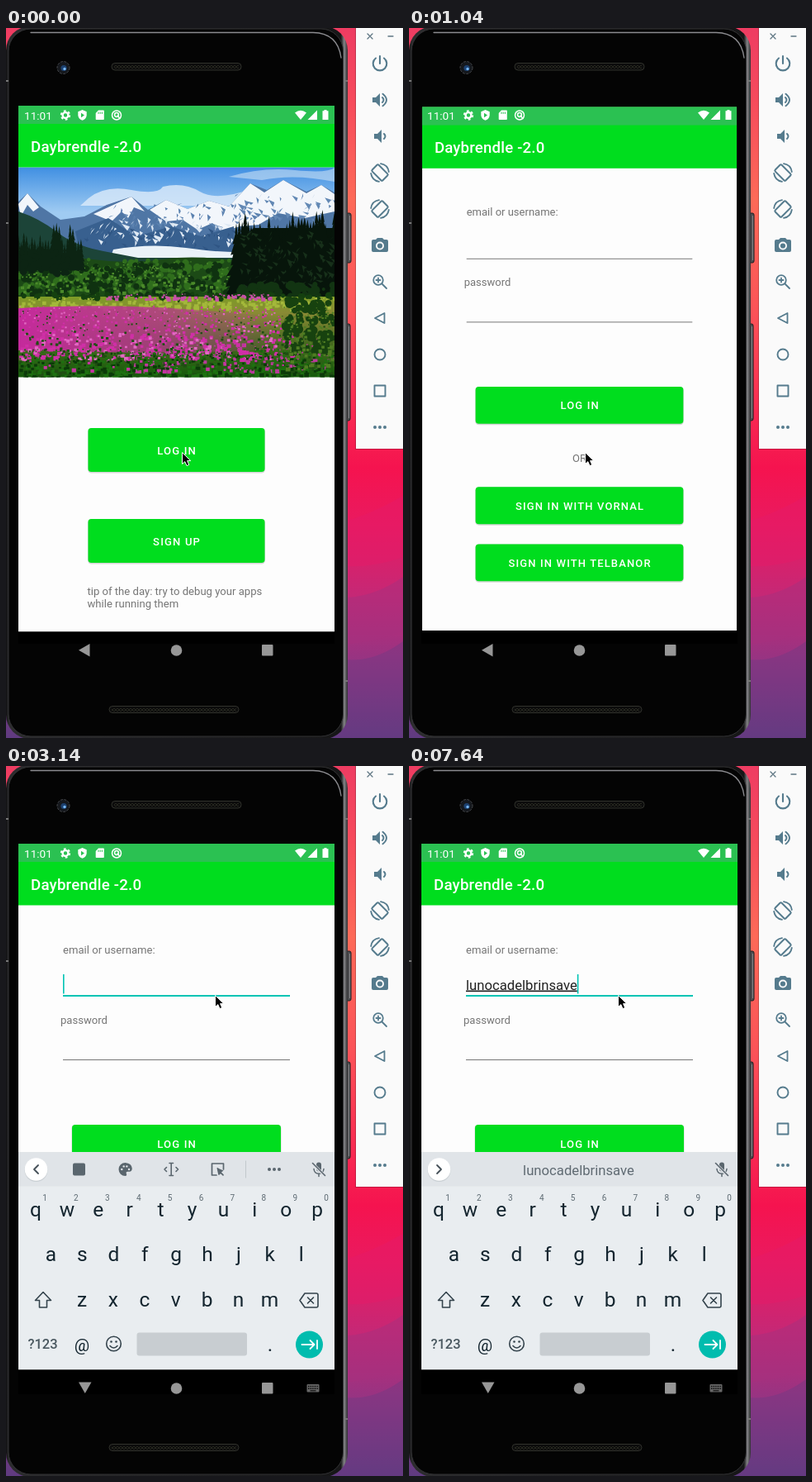
Animation, 481 px wide and 859 px high, one loop 8 s. Source, as an HTML page:

```html
<!DOCTYPE html>
<html lang="en">
<head>
<meta charset="utf-8">
<title>Login demo</title>
<style>
  html, body { margin: 0; width: 100%; height: 100%; overflow: hidden; background: #050505; }
  svg { display: block; }
  text { font-family: Roboto, sans-serif; white-space: pre; }
  .label { font-size: 13.1px; fill: #757575; }
  .title { font-size: 18.7px; font-weight: 500; fill: #fff; letter-spacing: .2px; }
  .btn { font-size: 13.05px; font-weight: 500; fill: #fff; letter-spacing: 1.16px; text-anchor: middle; }
  .key { font-size: 24.5px; fill: #14252f; text-anchor: middle; }
  .sup { font-size: 10px; fill: #5d6a72; text-anchor: middle; }
  .line { fill: none; stroke-linecap: round; stroke-linejoin: round; }
</style>
</head>
<body>
<svg id="stage" width="481" height="859" viewBox="0 0 481 859">
  <defs>
    <linearGradient id="wall" x2="0" y2="1">
      <stop offset="0" stop-color="#ee3c62"/><stop offset=".1" stop-color="#f64a5c"/>
      <stop offset=".24" stop-color="#fd6a58"/><stop offset=".4" stop-color="#fb5358"/>
      <stop offset=".52" stop-color="#f93052"/><stop offset=".62" stop-color="#f5134f"/>
      <stop offset=".7" stop-color="#e91a60"/><stop offset=".8" stop-color="#c52876"/>
      <stop offset=".89" stop-color="#963482"/><stop offset="1" stop-color="#5f3b80"/>
    </linearGradient>
    <linearGradient id="edge">
      <stop offset="0" stop-color="#101011"/><stop offset=".008" stop-color="#2c2c2e"/>
      <stop offset=".98" stop-color="#161617"/><stop offset=".99" stop-color="#858588"/>
      <stop offset="1" stop-color="#2d2d2f"/>
    </linearGradient>
    <linearGradient id="sky" x2="0" y2="1">
      <stop offset="0" stop-color="#3f8fe2"/><stop offset=".5" stop-color="#9fcbf2"/>
    </linearGradient>
    <linearGradient id="meadow" x2="0" y2="1">
      <stop offset="0" stop-color="#7d9c26"/><stop offset=".2" stop-color="#8a8a35"/>
      <stop offset=".55" stop-color="#4b6b20"/><stop offset="1" stop-color="#145a0a"/>
    </linearGradient>
    <linearGradient id="bloom">
      <stop offset="0" stop-color="#c52a9c"/><stop offset=".55" stop-color="#b9348f" stop-opacity=".75"/>
      <stop offset="1" stop-color="#a04080" stop-opacity="0"/>
    </linearGradient>
    <pattern id="mesh" width="4" height="4" patternUnits="userSpaceOnUse">
      <path d="M0 1h2M2 3h2" stroke="#3d4030" stroke-width="1"/>
    </pattern>
    <clipPath id="screen"><rect x="15" y="94" width="383" height="651"/></clipPath>
    <clipPath id="app"><rect x="15" y="94" width="383" height="636.500"/></clipPath>
    <clipPath id="press"><rect x="99.500" y="484" width="214" height="53" rx="4"/></clipPath>
  </defs>

  <rect width="481" height="859" fill="url(#wall)"/>
  <path d="M400 600Q440 590 481 566V640Q440 655 400 650z" fill="#e61a68" opacity=".5"/>
  <path d="M400 690Q445 690 481 664V730Q440 745 400 746z" fill="#a8317f" opacity=".5"/>
  <path d="M400 762Q440 772 481 742V859H400z" fill="#6d3a83" opacity=".4"/>

  <g fill="#4d4d50" stroke="#1e1e20">
    <rect x="412" y="224" width="6" height="60" rx="2"/>
    <rect x="412" y="358" width="5" height="117" rx="2"/>
  </g>
  <path d="M416.500 227v54M415.500 361v111" stroke="#88888b"/>
  <rect y="-2" width="414" height="862" rx="29" fill="url(#edge)"/>
  <rect x="3" y="1" width="405.500" height="856" rx="27" fill="#040404" stroke="#333335"/>
  <path d="M30 5.500H372Q402 6 406 36" class="line" stroke="#8c8c90" stroke-width="1.300"/>
  <path d="M0 236h3M0 64h3M410 64h4M410 790h4" stroke="#777" stroke-width="2"/>
  <g stroke="#3c3d35" stroke-width=".8">
    <rect x="128" y="42.500" width="157" height="8.500" rx="4" fill="#0c0c0c"/>
    <rect x="125" y="820.500" width="157" height="8" rx="4" fill="#0c0c0c"/>
  </g>
  <rect x="131" y="45" width="151" height="4" fill="url(#mesh)"/>
  <rect x="128" y="823" width="151" height="4" fill="url(#mesh)"/>
  <circle cx="69.500" cy="48" r="7.500" fill="#15181d" stroke="#47484c" stroke-dasharray="3 1.500"/>
  <circle cx="70" cy="48.500" r="3.600" fill="#1d4170"/><circle cx="71" cy="49.500" r="1.700" fill="#77b7f4"/>

  <g clip-path="url(#screen)">
    <rect x="15" y="94" width="383" height="651"/>
    <g id="home"></g>
    <g id="login"></g>
  </g>
  <g id="status"></g>
  <g clip-path="url(#app)"><g id="keyboard"></g></g>
  <rect id="navBack" x="15" y="730.500" width="383" height="29.500"/>
  <g id="nav" fill="#979797">
    <path id="back"/><circle cx="206.500" cy="753" r="6.800"/>
    <rect x="310" y="746" width="13.500" height="13.500" rx="1"/>
    <g id="kbIcon">
      <rect x="364.500" y="748" width="15" height="9.500" rx="1" fill="#666"/>
      <path d="M366 750.500h12M366 753.200h12" stroke="#000" stroke-width="1.400" stroke-dasharray="1.200 1"/>
      <path d="M368.500 755.800h7" stroke="#000" stroke-width="1"/>
    </g>
  </g>
  <g id="tools"></g>
  <path id="mouse" d="M.5 .5V14.500L3.800 11.600 6 16.600 8.700 15.400 6.600 10.600H10.800Z" fill="#000" stroke="#fff" stroke-width="1"/>
</svg>

<script>
const $ = id => document.getElementById(id);
const GREEN = '#00dd1e', TEAL = '#00c4b4', NAME = 'lunocadelbrinsave';

let seed = 11;
const rnd = (a = 0, b = 1) => a + (b - a) * ((seed = seed * 16807 % 2147483647) / 2147483647);
const many = (n, f) => Array.from({ length: n }, (_, i) => f(i)).join('');
const text = (cls, x, y, s, extra = '') => `<text class="${cls}" x="${x}" y="${y}" ${extra}>${s}</text>`;
const fill = (d, c, extra = '') => `<path d="${d}" fill="${c}" ${extra}/>`;
const put = (x, y, body) => `<g transform="translate(${x} ${y})">${body}</g>`;
const stroke = (d, c, w = 1.6) => `<path class="line" d="${d}" stroke="${c}" stroke-width="${w}"/>`;

function button(x, y, w, h, label) {
  return `<rect x="${x - .5}" y="${y}" width="${w + 1}" height="${h + 1.5}" rx="4.5" fill="#000" opacity=".16"/>
    <rect x="${x}" y="${y}" width="${w}" height="${h}" rx="4" fill="${GREEN}"/>` +
    text('btn', x + w / 2 + .6, y + h / 2 + 5, label);
}

function frame(body) {
  return `<rect x="15" y="94" width="383" height="636.500" fill="#fdfdfd"/>
    <rect x="15" y="730.500" width="383" height="33"/>${body}
    <rect x="15" y="94" width="383" height="74.500" fill="${GREEN}"/>
    <rect x="15" y="94" width="383" height="22" fill="#2bc152"/>` +
    text('title', 30, 149.5, 'Daybrendle -2.0');
}

// Conifer: stacked jagged tiers
function tree(x, base, h) {
  const w = h * .16;
  let l = '', r = '';
  for (let i = 1; i <= 7; i++) {
    const y = base - h + h * i / 7, e = w * i / 7 * rnd(.8, 1.2);
    l += `L${(x - e).toFixed(1)} ${y.toFixed(1)}L${(x - e * .55).toFixed(1)} ${(y - 1).toFixed(1)}`;
    r = `L${(x + e * .55).toFixed(1)} ${(y - 1).toFixed(1)}L${(x + e).toFixed(1)} ${y.toFixed(1)}` + r;
  }
  return `M${x} ${base - h}${l}${r}z`;
}

function specks(n, x0, x1, y0, y1, size) {
  return many(n, () => {
    const y = rnd(y0, y1), w = size * (.5 + (y - y0) / (y1 - y0)) * rnd(.6, 1.3);
    return `M${rnd(x0, x1).toFixed(1)} ${y.toFixed(1)}h${w.toFixed(1)}v${(w * .9).toFixed(1)}h${(-w).toFixed(1)}z`;
  });
}

function puffs(n, x0, x1, y0, y1, r0, r1) {
  return many(n, () => {
    const r = rnd(r0, r1).toFixed(1);
    return `M${rnd(x0, x1).toFixed(1)} ${rnd(y0, y1).toFixed(1)}a${r} ${r} 0 1 0 .1 0z`;
  });
}

// Slanting rock and snow streaks
function streaks(n, x0, x1, y0, y1) {
  return many(n, () => {
    const h = rnd(3, 9), lean = rnd(-7, 7);
    return `M${rnd(x0, x1).toFixed(1)} ${rnd(y0, y1).toFixed(1)}l${lean.toFixed(1)} ${h.toFixed(1)}l${rnd(1, 4).toFixed(1)} ${(-h * .6).toFixed(1)}z`;
  });
}

function photo() {
  return `<svg x="15" y="168.500" width="383" height="254" viewBox="15 168.500 383 254">
    <rect x="15" y="168" width="383" height="110" fill="url(#sky)"/>` +
    fill('M100 206Q120 190 152 196T190 192Q215 186 235 198T300 194V215H90z', '#dcecfa', 'opacity=".8"') +
    fill('M270 180Q310 168 350 172T398 169V186Q350 176 310 184z', '#c8e0f6', 'opacity=".6"') +
    fill('M15 210L26 200 42 216 66 232 95 228 122 214 152 204 172 220 194 208 220 219 246 209 270 216 296 188 316 196 336 184 364 198 382 190 398 199V285H15z', '#4f76a5') +
    fill('M15 213L26 200 40 217 33 222 26 214 18 228zM106 225L152 204 168 222 155 217 148 230 140 222 128 234zM174 220L194 208 220 219 246 209 270 216 296 188 313 199 336 184 364 200 382 190 398 201V222L362 230 330 224 306 238 284 240 262 246 250 236 232 244 214 232 194 234z', '#f2f6fb') +
    fill(streaks(70, 125, 300, 212, 238), '#5b82b0') + fill(streaks(50, 280, 398, 198, 232), '#6288b4') +
    fill('M84 246L124 230 158 252 200 240 236 252 276 240V275H90z', '#38608f') +
    fill(streaks(85, 100, 275, 228, 258), '#dfe9f4') + fill(streaks(45, 85, 275, 240, 264), '#2f5584') +
    fill('M130 268Q175 260 218 266T290 271V285H124z', '#eaf2f8') +
    fill('M15 222Q40 230 62 247T118 270L160 278H290V340H15z', '#1c4438') +
    fill('M15 284Q60 274 105 280T190 280T290 283H398V335H15z', '#1c4a16') +
    fill(puffs(190, 15, 285, 278, 318, 2, 5), '#2f6d1c') + fill(puffs(190, 15, 290, 282, 324, 2, 5), '#0f3210') +
    fill(specks(220, 15, 290, 282, 320, 2.5), '#4b8a2a') +
    fill(many(24, i => tree(15 + i * 3.3, 294, rnd(30, 60))), '#0c2413') +
    fill(puffs(60, 15, 75, 266, 294, 2, 5), '#0c2413') +
    fill('M279 262L300 242H398V330H283z', '#07150b') +
    fill(many(34, i => tree(279 + i * 3.6, 326, rnd(74, 106))), '#07150b') +
    fill(streaks(120, 282, 398, 245, 312), '#17301a') +
    fill(puffs(70, 282, 398, 305, 328, 2, 6), '#123412') +
    `<rect x="15" y="325" width="383" height="98" fill="url(#meadow)"/>` +
    fill(puffs(70, 15, 398, 319, 325, 2, 4), '#14400f') +
    fill(specks(200, 15, 398, 326, 337, 4), '#a3b83a') +
    fill(specks(90, 120, 320, 321, 327, 3), '#c850a8') +
    '<path d="M15 339Q120 333 215 340T335 350V388Q220 396 15 390z" fill="url(#bloom)"/>' +
    fill(specks(420, 15, 345, 336, 398, 3.4), '#cf2fa6') +
    fill(specks(240, 15, 330, 336, 401, 2.8), '#e268c2') +
    fill(specks(150, 150, 398, 372, 414, 3.2), '#b83a98') +
    fill(specks(420, 15, 398, 342, 423, 2.8), '#1f4e12') +
    fill(specks(420, 15, 398, 388, 423, 3.4), '#1d7010') +
    fill(specks(260, 15, 398, 392, 423, 3.4), '#0b3a08') +
    fill(specks(60, 15, 340, 394, 414, 3), '#c434a0') +
    fill(puffs(110, 338, 398, 324, 388, 2, 6), '#17420f') +
    fill(specks(110, 335, 398, 335, 412, 3), '#4f7d22') + '</svg>';
}

$('home').innerHTML = frame(
  photo() + button(99.5, 484, 214, 53, 'LOG IN') + button(99.5, 594, 214, 53, 'SIGN UP') +
  text('label', 98.5, 685.5, 'tip of the day: try to debug your apps') +
  text('label', 98.5, 700.5, 'while running them') +
  '<circle id="ripple" cx="213" cy="513" fill="#fff" opacity=".24" clip-path="url(#press)"/>');

$('login').innerHTML = frame(
  text('label', 69, 226.5, 'email or username:') + text('label', 66, 311.5, 'password') +
  `<rect id="rule" x="69" width="275"/><rect x="69" y="355" width="275" height="1" fill="#777"/>` +
  text('', 69, 270.5, '', 'id="typed" font-size="16.7" fill="#222" text-decoration="underline"') +
  `<rect id="caret" y="252" width="1.600" height="23.500" fill="${TEAL}"/>` +
  button(80, 434, 253, 45, 'LOG IN') +
  text('label', 206.5, 525.5, 'OR', 'text-anchor="middle"') +
  button(80, 556, 253, 45, 'SIGN IN WITH VORNAL') + button(80, 625.5, 253, 45, 'SIGN IN WITH TELBANOR'));

$('status').innerHTML = text('', 22, 110.5, '11:01', 'font-size="13.6" fill="#fff"') +
  `<circle cx="72" cy="105.500" r="3.400" fill="none" stroke="#fff" stroke-width="2.400"/>
   <circle cx="72" cy="105.500" r="5.200" fill="none" stroke="#fff" stroke-width="2" stroke-dasharray="2.700 2.745"/>` +
  fill('M92.500 99l5.200 2.200v4q0 4.500-5.200 6.600-5.200-2.100-5.200-6.600v-4z', '#fff') +
  fill('M91 102.800v5.400l4-2.700z', '#2bc152') +
  fill('M112 99.500h6q.8 0 .8.800v10q0 .8-.8.800h-8.500q-.8 0-.8-.8v-7.300z', '#fff') +
  stroke('M112 102v1.500M114.200 102v1.500M116.400 102v1.500', '#2bc152', 1) +
  `<circle cx="134" cy="105.500" r="5.500" fill="none" stroke="#fff" stroke-width="1.500"/>
   <circle cx="134" cy="105" r="2.400" fill="none" stroke="#fff" stroke-width="1.500"/>` +
  stroke('M135 106l3 3.500', '#fff', 1.5) +
  fill('M350 102.500Q357 97 364 102.500L357 111z', '#fff') +
  fill('M377 99.500V111H365.500z', '#fff') +
  fill('M385.500 99h3v1.300h2v10.700h-7v-10.700h2z', '#fff');

const rows = [['qwertyuiop', 36, 545], ['asdfghjkl', 54.5, 599], ['zxcvbnm', 92, 653.5]];
const DIM = '#5a666e';
$('keyboard').innerHTML =
  `<rect x="15" y="467" width="383" height="264" fill="#e9edf0"/>
   <rect x="15" y="467" width="383" height="41.500" fill="#e0e4e8"/>
   <circle cx="36.500" cy="489" r="14" fill="#aeb5ba" opacity=".45"/><circle cx="36.500" cy="488" r="13.800" fill="#fff"/>
   <path id="chevron" class="line" stroke="#455058" stroke-width="1.800"/>
   <g id="shortcuts"><rect x="81" y="480.500" width="15" height="15" rx="2" fill="${DIM}"/>` +
  fill('M144.500 480a8 8 0 1 0 0 16q2.500-.5 1.300-3-.8-2 1.500-2.300h2.300q3 0 3.200-3.700-.5-6.500-8.300-7z', DIM) +
  many(4, i => `<circle cx="${[140.3, 142.7, 146.4, 149][i]}" cy="${[488, 484.4, 484.4, 488][i]}" r="1.200" fill="#e0e4e8"/>`) +
  stroke('M198 480.500h4.500M198 495.500h4.500M200.200 480.500v15M194.500 485.500l-2.500 2.500 2.500 2.500M206 485.500l2.500 2.500-2.500 2.500', DIM) +
  stroke('M255 495h-5.500v-14h14v7M256.500 487l1.500 7 2-2.200 3 3', DIM, 1.7) + fill('M255.500 486l8 3.500-5 4z', DIM) +
  '<path d="M290.500 477.500v21" stroke="#c2c8cc"/>' +
  many(3, i => `<circle cx="${319 + i * 6}" cy="488" r="2" fill="${DIM}"/>`) + '</g>' +
  text('', 205.5, 494.5, '', `id="hint" font-size="16.7" fill="#5f6a72" text-anchor="middle"`) +
  `<rect x="376" y="479.500" width="6" height="11" rx="3" fill="${DIM}"/>` +
  stroke('M373 487.500q.5 5.500 6 5.700 5.500-.2 6-5.700M379 493.500v3', DIM, 1.5) +
  stroke('M371.500 481l14.500 14.500', '#e0e4e8', 3.6) + stroke('M371.500 480.500l15 15', DIM, 1.6) +
  rows.map(([keys, x, y]) => many(keys.length, i => text('key', x + i * 37.9, y, keys[i]))).join('') +
  many(10, i => text('sup', 47 + i * 37.9, 525.5, (i + 1) % 10)) +
  stroke('M45 636.500l-9.500 10h5v8.500h9v-8.500h5z', '#34434c') +
  stroke('M362 638h14q2 0 2 2v13q0 2-2 2h-14l-6-8.500zM365.500 643l7 7M372.500 643l-7 7', '#34434c') +
  text('', 44.5, 705, '?123', 'font-size="16.500" font-weight="500" fill="#4a5860" text-anchor="middle"') +
  text('', 92, 707.500, '@', 'font-size="20.500" fill="#14252f" text-anchor="middle"') +
  `<circle cx="130.500" cy="699" r="8.800" fill="none" stroke="#34434c" stroke-width="1.600"/>
   <circle cx="127.500" cy="696.500" r="1.300" fill="#34434c"/><circle cx="133.500" cy="696.500" r="1.300" fill="#34434c"/>` +
  stroke('M126 701.500q4.500 5 9 0', '#34434c') +
  `<rect x="158.500" y="685.500" width="133.500" height="28" rx="3" fill="#c8cdd1"/>` +
  text('key', 320, 708, '.') +
  `<circle cx="367.500" cy="700" r="16.500" fill="#00bcae"/>` +
  stroke('M358.500 700h14.500M368.500 695l5 5-5 5M377 695v10', '#fff', 1.8);

const INK = '#557b8d';
const phoneTurn = flip => `<g transform="scale(${flip} 1)">
  <rect x="-5.500" y="-9" width="11" height="18" rx="1.500" transform="rotate(-45)" fill="none" stroke="${INK}" stroke-width="2"/>
  ${stroke('M1 -10.800Q9.500 -9.500 10.800 -1M-1 10.800Q-9.500 9.500 -10.800 1', INK, 1.8)}</g>`;
const speaker = (x, waves) => fill(`M${x} -3h4l5 -5v16l-5 -5h-4z`, INK) + stroke(waves, INK, 1.9);
const tools = [
  stroke('M0 -9V0M-5 -6.500A8.300 8.300 0 1 0 5 -6.500', INK, 2.1),
  speaker(-9, 'M3 -3q3 3 0 6M3.500 -7.300q9 7.300 0 14.600'),
  speaker(-7, 'M5 -3q3 3 0 6'),
  phoneTurn(1), phoneTurn(-1),
  fill('M-3 -9h6l2 2h3q2 0 2 2v11q0 2-2 2h-16q-2 0-2-2v-11q0-2 2-2h3z', INK) +
    '<circle cy=".5" r="5" fill="#fafafa"/>' + `<circle cy=".5" r="3.100" fill="${INK}"/>`,
  `<circle cx="-2" cy="-2" r="5.800" fill="none" stroke="${INK}" stroke-width="1.800"/>` +
    stroke('M2.500 2.500L8 8M-4.500 -2h5M-2 -4.500v5', INK, 1.8),
  stroke('M5.500 -6V6L-6 0z', INK, 1.8),
  `<circle r="6.500" fill="none" stroke="${INK}" stroke-width="1.900"/>`,
  stroke('M-6.500 -6.500h13v13h-13z', INK, 1.9),
  many(3, i => `<circle cx="${i * 6 - 6}" r="2" fill="${INK}"/>`)
];
$('tools').innerHTML = '<rect x="423" y="-1" width="60" height="511" fill="#000" opacity=".2"/>' +
  '<rect x="424" width="57" height="509" fill="#fafafa"/>' +
  stroke('M438 7l6 6M444 7l-6 6M463 10h6', '#5d7582', 1.3) +
  tools.map((body, i) => put(453, 43 + i * 44, body)).join('');

// Rows: start time, then values held until the next row
const windows = [[0, 1, 1, 0], [890, 1.0234, .922, .4], [1040, 0, .995, 1], [1190, 0, 1, 1]];
const ripple = [[0, 0], [600, 32], [740, 85], [890, 0]];
const pointer = [[0, 213, 513], [1190, 216, 490], [1340, 224, 432], [1490, 234, 366], [1640, 241, 315],
  [1790, 246, 262], [1940, 250, 222], [2090, 253, 202], [2240, 255, 225], [2390, 255, 260], [2540, 253, 277]];
const caretOn = [[0, 0], [2840, 1], [3440, 0], [3890, 1]];
const slide = [[0, 300], [2990, 120], [3140, 0]];
const typing = [[0, 0], [3890, 1], [4040, 2], [4640, 3], [4790, 4], [5240, 5], [5390, 6], [5540, 7], [5690, 8],
  [5840, 9], [6590, 10], [6740, 11], [6890, 12], [7040, 13], [7190, 14], [7340, 15], [7640, 17]];

const at = (rows, t) => rows.filter(r => r[0] <= t).pop().slice(1);
const set = (id, attrs) => { for (const k in attrs) $(id).setAttribute(k, attrs[k]); };
const zoom = k => `translate(206.5 428) scale(${k}) translate(-206.5 -428)`;
const show = on => on ? 'inline' : 'none';

function draw(t) {
  const [old, fresh, alpha] = at(windows, t);
  set('home', { transform: zoom(old || 1), display: show(old) });
  set('login', { transform: zoom(fresh), opacity: alpha });
  set('ripple', { r: at(ripple, t)[0] });
  set('mouse', { transform: `translate(${at(pointer, t)})` });

  const focus = t >= 2690;
  set('rule', { y: focus ? 277 : 278, height: focus ? 2 : 1, fill: focus ? TEAL : '#777' });

  const n = at(typing, t)[0], word = NAME.slice(0, n);
  $('typed').textContent = $('hint').textContent = word;
  const w = n ? $('typed').getComputedTextLength() : 0;
  set('caret', { x: 69 + w, display: show(at(caretOn, t)[0]) });
  set('shortcuts', { display: show(!n) });
  set('chevron', { d: n ? 'M34 483l5 5-5 5' : 'M39 483l-5 5 5 5' });

  const dy = at(slide, t)[0], open = dy < 300;
  set('keyboard', { transform: `translate(0 ${dy})`, display: show(open) });
  set('navBack', { display: show(open) });
  set('kbIcon', { display: show(open) });
  set('back', { d: open ? 'M88 745.500h15.500l-7.750 13.500z' : 'M101.500 745v15.500l-13.500-7.750z' });
}

const start = performance.now();
function tick() {
  draw((performance.now() - start) % 8000);
  requestAnimationFrame(tick);
}
tick();
</script>
</body>
</html>
```
